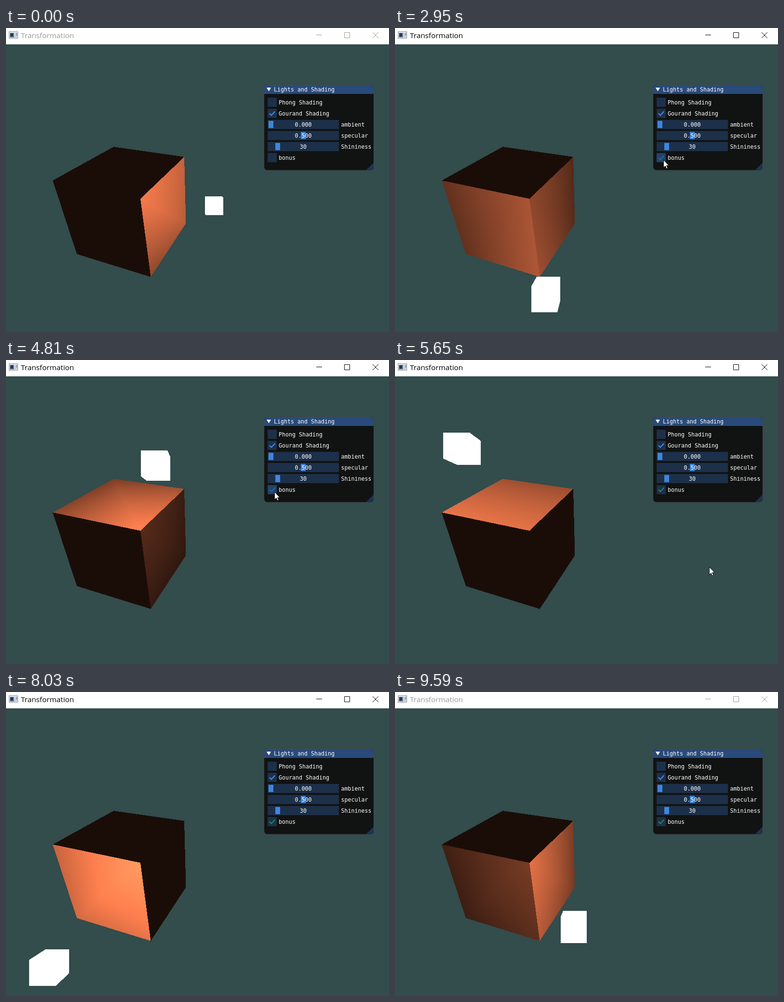
These frames come from a looping animation (795x632 px, 9.67 s). An HTML page with a canvas:

```html
<!DOCTYPE html>
<html lang="en">
<head>
<meta charset="utf-8">
<title>Transformation</title>
<style>
  html, body { margin: 0; width: 100%; height: 100%; overflow: hidden; background: #334c4c; }
  canvas, svg { position: absolute; left: 0; top: 0; display: block; }
  .title { font: 15.3px "Open Sans", "Noto Sans", sans-serif; }
  .ui text { font: 11.63px "DejaVu Sans Mono", monospace; fill: #fff; }
</style>
</head>
<body>
<canvas id="scene" width="795" height="632"></canvas>
<svg width="795" height="632" viewBox="0 0 795 632">
  <path id="lamp" fill="#fff" shape-rendering="crispEdges"/>
  <rect width="795" height="34" fill="#fff"/>
  <g shape-rendering="crispEdges">
    <rect x="6" y="7" width="19" height="15" fill="#8b9299"/>
    <rect x="7" y="8" width="17" height="13" fill="#e9edf0"/>
    <rect x="8" y="10" width="9" height="10" fill="#7d8fa3"/>
    <rect x="9" y="11" width="6" height="7" fill="#233a5c"/>
    <rect x="18" y="10" width="5" height="10" fill="#c3ccd6"/>
    <rect x="22" y="10" width="1" height="6" fill="#3d5f8c"/>
  </g>
  <text id="caption" class="title" x="31" y="21">Transformation</text>
  <path id="buttons" d="M644 14.5H656M702.5 9.5H713.5V20.5H702.5ZM761 9L773 21M773 9L761 21" fill="none"/>
  <g class="ui" id="panel">
    <rect x="535.5" y="118.5" width="228" height="177.5" rx="7" fill="#111312" stroke="#42484f"/>
    <path d="M536 137V126Q536 119 543 119H756Q763 119 763 126V137Z" fill="#294a7a"/>
    <path d="M541 124H550L545.5 131.5Z" fill="#fff"/>
    <text x="556" y="132">Lights and Shading</text>
    <path d="M763 280V289Q763 296 756 296H747Z" fill="#1e3252"/>
  </g>
  <path id="cursor" d="M.5 .5V16.2L4.1 12.8L6.5 18.5L9 17.4L6.6 11.9H11.4Z" fill="#fff" stroke="#000" stroke-width=".9"/>
</svg>
<script>
const LOOP = 9670, STEP = 77.3, ORBIT_START = 1550, LAST_STEP = 104;
const $ = id => document.getElementById(id);
const ctx = $('scene').getContext('2d');

// --- panel ---
const panel = $('panel');
function add(tag, attrs, text) {
  const el = document.createElementNS('http://www.w3.org/2000/svg', tag);
  for (const name in attrs) el.setAttribute(name, attrs[name]);
  if (text) el.textContent = text;
  panel.append(el);
  return el;
}
function checkbox(y, label) {
  const box = add('rect', { x: 543, y, width: 19, height: 19, fill: '#1d304a' });
  const tick = add('path', {
    d: `M546.8 ${y + 9.5}L550.8 ${y + 13.5}L558.3 ${y + 5.5}`,
    fill: 'none', stroke: '#3f8bea', 'stroke-width': 2.2
  });
  add('text', { x: 566, y: y + 14 }, label);
  return { box, tick };
}
function slider(y, grab, value, label) {
  add('rect', { x: 543, y, width: 148, height: 19, fill: '#1d304a' });
  add('rect', { x: grab, y: y + 2, width: 10, height: 15, fill: '#3d85e0' });
  add('text', { x: 617, y: y + 14, 'text-anchor': 'middle' }, value);
  add('text', { x: 695.5, y: y + 14 }, label);
}
checkbox(145, 'Phong Shading').tick.remove();
checkbox(168, 'Gourand Shading');
slider(191, 545, '0.000', 'ambient');
slider(214, 612, '0.500', 'specular');
slider(237, 559, '30', 'Shininess');
const bonus = checkbox(260, 'bonus');

// --- vectors ---
const dot = (a, b) => a[0] * b[0] + a[1] * b[1] + a[2] * b[2];
const mix = (a, p, b, q) => a.map((v, i) => v * p + b[i] * q);
const unit = a => a.map(v => v / Math.hypot(...a));

// --- cube with per-vertex lighting ---
const CAMERA = [0.81, 0.21, 3], FOCAL = 518, CX = 397.5, CY = 333;
const AXES = [[-0.939, 0.169, -0.298], [0.354, 0.48, -0.802], [-0.008, -0.86, -0.509]];
const CORAL = [255, 127.5, 79];

const corner = (x, y, ...signs) => {
  const pos = [0, 1, 2].map(i => signs.reduce((sum, s, j) => sum + s * AXES[j][i] / 2, 0));
  return { x, y, pos, depth: CAMERA[2] - pos[2] };
};
const D = corner(279, 355, -1, -1, -1), A = corner(97, 317, 1, -1, -1),
      C = corner(370, 268, -1, 1, -1),  F = corner(300.5, 517.5, -1, -1, 1),
      B = corner(223.5, 247, 1, 1, -1), E = corner(147, 470, 1, -1, 1),
      G = corner(373.5, 406, -1, 1, 1);
const FACES = [
  { axis: 2, tris: [[D, A, B], [D, B, C]] },
  { axis: 1, tris: [[D, A, E], [D, E, F]] },
  { axis: 0, tris: [[D, C, G], [D, G, F]] }
];
const BOX = { x: 96, y: 246, w: 279, h: 273 };
const image = ctx.createImageData(BOX.w, BOX.h);

function shade(pos, normal, light) {
  const toLight = unit(mix(light, 1, pos, -1));
  const toEye = unit(mix(CAMERA, 1, pos, -1));
  const lambert = dot(normal, toLight);
  const mirrored = mix(normal, 2 * lambert, toLight, -1);
  return 0.1 + Math.max(0, lambert) + 0.5 * Math.max(0, dot(toEye, mirrored)) ** 30;
}

function fillTriangle(tri, tones) {
  const [a, b, c] = tri;
  const xs = tri.map(v => v.x), ys = tri.map(v => v.y);
  const area = (b.x - a.x) * (c.y - a.y) - (c.x - a.x) * (b.y - a.y);
  for (let y = Math.floor(Math.min(...ys)); y <= Math.max(...ys); y++) {
    for (let x = Math.floor(Math.min(...xs)); x <= Math.max(...xs); x++) {
      const px = x + 0.5, py = y + 0.5;
      let v = ((px - a.x) * (c.y - a.y) - (c.x - a.x) * (py - a.y)) / area;
      let w = ((b.x - a.x) * (py - a.y) - (px - a.x) * (b.y - a.y)) / area;
      let u = 1 - v - w;
      if (u < -1e-6 || v < -1e-6 || w < -1e-6) continue;
      u /= a.depth; v /= b.depth; w /= c.depth;
      const tone = (u * tones[0] + v * tones[1] + w * tones[2]) / (u + v + w);
      const at = ((y - BOX.y) * BOX.w + x - BOX.x) * 4;
      for (let i = 0; i < 3; i++) image.data[at + i] = CORAL[i] * tone;
      image.data[at + 3] = 255;
    }
  }
}

function drawCube(light) {
  image.data.fill(0);
  for (const { axis, tris } of FACES) {
    const normal = AXES[axis].map(v => -v);
    for (const tri of tris) fillTriangle(tri, tri.map(v => shade(v.pos, normal, light)));
  }
  ctx.putImageData(image, BOX.x, BOX.y);
}

// --- lamp: small axis-aligned cube seen in perspective ---
function drawLamp([lx, ly, lz]) {
  const ring = z => [[-1, -1], [1, -1], [1, 1], [-1, 1]].map(([i, j]) => {
    const k = FOCAL / (CAMERA[2] - z);
    return [Math.round(CX + (lx + i * 0.1 - CAMERA[0]) * k),
            Math.round(CY - (ly + j * 0.1 - CAMERA[1]) * k)];
  });
  const near = ring(lz + 0.1), far = ring(lz - 0.1);
  const quads = [near, far];
  for (let i = 0; i < 4; i++) {
    const n = (i + 1) % 4, side = [near[i], near[n], far[n], far[i]];
    const turn = side.reduce((s, p, k) => {
      const q = side[(k + 1) % 4];
      return s + p[0] * q[1] - q[0] * p[1];
    }, 0);
    quads.push(turn < 0 ? side : side.reverse());
  }
  $('lamp').setAttribute('d', quads.map(q => 'M' + q.join('L') + 'Z').join(''));
}

// --- motion ---
const ANGLES = [[0, -2.32], [4, -2.009], [33, 0.2376], [53, 1.794], [70, 3.128], [84, 4.2388], [104, 5.7825]];
const POINTER = [
  [150, 667, 569], [300, 645, 490], [450, 610, 410], [600, 580, 360], [800, 561, 300],
  [1070, 557, 275], [1170, 557, 274], [4950, 557, 274], [5200, 585, 335], [5500, 641, 423],
  [5647, 652, 430], [6200, 690, 500], [6510, 728, 566], [6700, 745, 615], [6800, 752, 640]
];
function sample(keys, t) {
  let i = 1;
  while (i < keys.length - 1 && keys[i][0] < t) i++;
  const a = keys[i - 1], b = keys[i];
  const p = Math.min(1, Math.max(0, (t - a[0]) / (b[0] - a[0])));
  return a.slice(1).map((v, j) => v + (b[j + 1] - v) * p);
}

let shown = '';
function render(t) {
  const step = Math.min(LAST_STEP, Math.floor((t - ORBIT_START) / STEP + 0.2));
  const orbiting = t >= ORBIT_START;
  const focused = t >= 1320 && t < 9200;
  const key = [step, orbiting, focused, t < 150].join();
  if (key === shown) return;
  shown = key;

  let light = [1, 0.01, 0.1];
  if (orbiting) {
    const [angle] = sample(ANGLES, step);
    light = [0.8125 * Math.cos(angle), 0.798 * Math.sin(angle), 1];
  }
  drawCube(light);
  drawLamp(light);

  const ink = focused ? '#000' : '#999';
  $('caption').setAttribute('fill', ink);
  $('buttons').setAttribute('stroke', ink);

  const [x, y] = sample(POINTER, ORBIT_START + step * STEP).map(Math.round);
  const cursor = $('cursor');
  cursor.setAttribute('transform', `translate(${x} ${y})`);
  cursor.setAttribute('visibility', t < 150 || y > 632 ? 'hidden' : 'visible');

  const hover = focused && x < 562 && y < 279;
  bonus.box.setAttribute('fill', hover ? '#21426a' : '#1d304a');
  bonus.tick.setAttribute('stroke', hover ? '#2d62a0' : '#21895a');
  bonus.tick.setAttribute('visibility', orbiting ? 'visible' : 'hidden');
}

const start = performance.now();
function tick() {
  render((performance.now() - start) % LOOP);
  requestAnimationFrame(tick);
}
tick();
</script>
</body>
</html>
```
